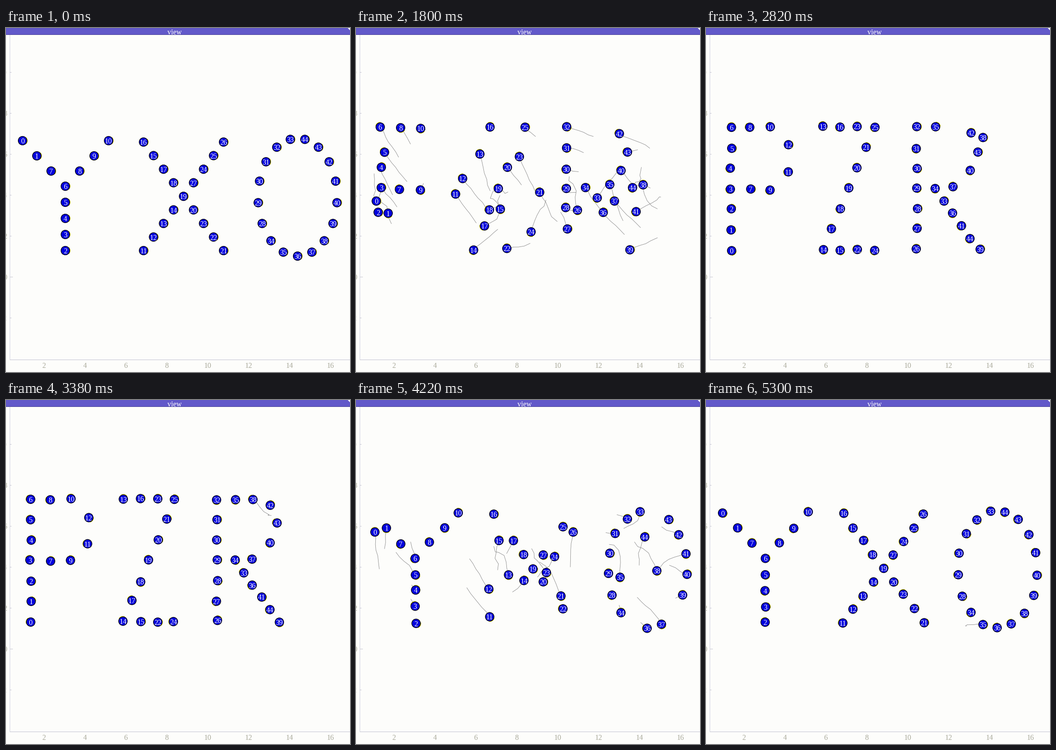
Recreate the animation shown at these times as a matplotlib script. Size 748 px wide and 748 px high, loop 5.4 s.

```python
import numpy as np
import matplotlib.pyplot as plt
from matplotlib.animation import FuncAnimation
from matplotlib.collections import EllipseCollection, LineCollection

SIZE, DPI = 748, 100
PT = 72 / DPI                      # points per pixel
TICK_MS, LOOP_MS = 20, 5400
COUNT, LAST_STEP = 45, 113
LEAVE, RETURN = 27, 77             # steps at which the robots set off
STRIDE, SPACING, TRAIL = 13.4, 23, 6
FONT = "Liberation Serif"

# robot, stopover, first step, release step
STOPOVERS = [
    (38, (602, 238), LEAVE, 66),
    (38, (572, 250), 66, 70),
    (35, (565, 490), RETURN, 111),
]


def row(start, end, n):
    return np.linspace(start, end, n)


def first_word():
    p = np.zeros((COUNT, 2))
    p[[0, 1, 7]] = row((36, 245), (98, 311), 3)
    p[[10, 9, 8]] = row((223, 245), (160, 311), 3)
    p[2:7] = row((129, 484), (129, 344), 5)
    p[[11, 12, 13, 14, 19, 27, 24, 25, 26]] = row((299, 484), (473, 248), 9)
    p[[16, 15, 17, 18, 19, 20, 23, 22, 21]] = row((299, 248), (473, 484), 9)
    ring = [33, 32, 31, 30, 29, 28, *range(34, 45)]
    a = np.arange(-8, 9) * 2 * np.pi / 17
    p[ring] = np.column_stack([634 + 86 * np.sin(a), 368 + 128 * np.cos(a)])
    return p


def second_word():
    p = np.zeros((COUNT, 2))
    p[0:7] = row((54, 483), (54, 216), 7)
    p[[8, 10, 12, 11, 9, 7]] = [(96, 216), (140, 216), (178, 255),
                                (178, 312), (140, 351), (96, 351)]
    p[[13, 16, 23, 25]] = row((255, 216), (367, 216), 4)
    p[[14, 15, 22, 24]] = row((255, 482), (367, 482), 4)
    p[17:22] = row((255, 482), (367, 216), 7)[1:-1]
    p[26:33] = row((458, 481), (458, 216), 7)
    p[[35, 38, 42, 43, 40, 37, 34]] = [(498, 216), (537, 215), (575, 229), (591, 269),
                                       (575, 309), (537, 347), (498, 348)]
    p[[33, 36, 41, 44, 39]] = row((517, 376), (594, 482), 5)
    return p


def separate(pos):
    """Push close robots apart, with a slight turn so they pass each other."""
    diff = pos[:, None] - pos[None]
    dist = np.hypot(diff[..., 0], diff[..., 1]) + np.eye(COUNT) * 1e6
    push = (diff * (np.clip(SPACING - dist, 0, None) / 2 / dist)[..., None]).sum(1)
    turn = np.column_stack([-push[:, 1], push[:, 0]])
    return pos + push + 0.5 * turn


def simulate():
    rng = np.random.default_rng(4)
    home, away = first_word(), second_word()
    pos, path = home.copy(), [home] * LEAVE
    for step in range(LEAVE, LAST_STEP + 1):
        goal = (away if step < RETURN else home).copy()
        for robot, point, first, release in STOPOVERS:
            if first <= step < release:
                goal[robot] = point
        stride = STRIDE / 2 if step in (LEAVE, RETURN) else STRIDE
        for _ in range(4):
            delta = goal - pos
            dist = np.hypot(*delta.T) + 1e-6
            pos = pos + delta * np.minimum(1, stride / 4 / dist)[:, None]
            pos = separate(pos)
        pos = pos + rng.normal(0, 1.1, pos.shape)
        path.append(pos)
    return np.array(path)


def step_at(ms):
    cycle, rest = divmod(ms, 140)
    return min(3 * cycle + (rest >= 20) + (rest >= 120), LAST_STEP)


path = simulate()

fig = plt.figure(figsize=(SIZE / DPI, SIZE / DPI), dpi=DPI, facecolor="#fdfdfb")
ax = fig.add_axes([0, 0, 1, 1])
ax.set(xlim=(0, SIZE), ylim=(SIZE, 0))
ax.axis("off")


def label(x, y, text, color, ha="center", **kw):
    return ax.text(x, y, text, color=color, ha=ha, va="center_baseline",
                   family=FONT, fontsize=16 * PT, **kw)


# title bar
ax.fill([0, 743, 748, 748, 0], [0, 0, 5, 14, 14], color="#6259c9", lw=0)
ax.plot([0, SIZE], [13.5, 13.5], color="#453f94", lw=PT)
label(367, 8, "view", "white")

# axes
ax.plot([8.5, 8.5], [15, 721], color="#b4b4d2", lw=PT, ls=(0, (2, 1)))
ax.plot([8, SIZE], [720.5, 720.5], color="#c0c0d0", lw=PT)
for value in range(2, 17, 2):
    label(82.5 + (value - 2) * 44.53, 733, str(value), "#a9a99a")
for value in range(-2, 11, 2):
    y = 541 - value * 44.55
    label(2, y, str(value), "#b4b4a6", ha="right")
    ax.plot([8, 14 if value == 0 else 11], [y, y], color="#c4c4d0", lw=PT)

trails = LineCollection([], colors="#808080", linewidths=0.8 * PT, zorder=3)
noses = LineCollection([], colors="#c9c41e", linewidths=1.6 * PT, zorder=4)
discs = EllipseCollection([18.8] * COUNT, [18.8] * COUNT, [0] * COUNT, units="xy",
                          offsets=path[0], offset_transform=ax.transData,
                          facecolors="#0000dc", edgecolors="black",
                          linewidths=1.3 * PT, zorder=5)
for artist in (trails, noses, discs):
    ax.add_collection(artist, autolim=False)
numbers = [label(*path[0, i], str(i), "white", zorder=6) for i in range(COUNT)]
sweep = np.radians(np.linspace(-40, 40, 9))


def draw(frame):
    step = step_at(frame * TICK_MS)
    pos = path[step]
    move = pos - path[max(step - 1, 0)]
    angle = np.arctan2(move[:, 1], move[:, 0])[:, None] + sweep
    arcs = pos[:, None] + 10.2 * np.stack([np.cos(angle), np.sin(angle)], axis=-1)
    noses.set_segments(arcs)
    recent = path[max(step - TRAIL, 0):step + 1]
    trails.set_segments(list(recent.transpose(1, 0, 2)) if step >= LEAVE else [])
    discs.set_offsets(pos)
    for number, xy in zip(numbers, pos):
        number.set_position(xy)
    return [trails, noses, discs, *numbers]


anim = FuncAnimation(fig, draw, frames=LOOP_MS // TICK_MS, interval=TICK_MS,
                     repeat=True, repeat_delay=0, blit=False)
plt.show()
```
